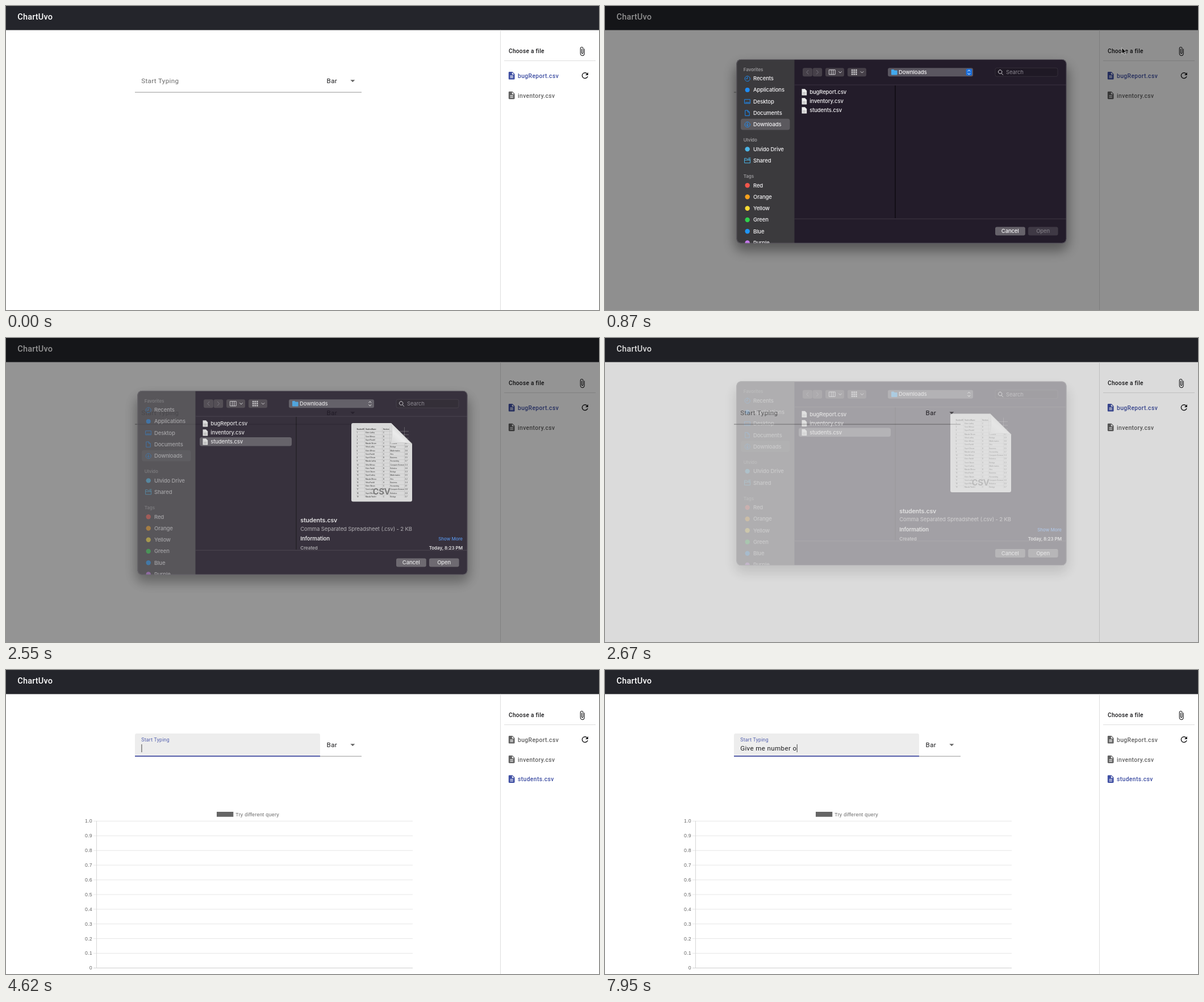
An HTML page that plays this animation: 1044x536 px, repeating every 8000 ms.

```html
<!DOCTYPE html>
<html lang="en">
<head>
<meta charset="utf-8">
<title>Chart query</title>
<style>
html, body { margin: 0; width: 100%; height: 100%; overflow: hidden; background: #fff; }
svg { display: block; width: 1044px; height: 536px; }
text { white-space: pre; }
.app { font: 400 11.6px Roboto, sans-serif; letter-spacing: .36px; }
.app .brand { font-size: 14.5px; font-weight: 500; letter-spacing: .18px; fill: #fff; }
.app .choose { font-size: 10.2px; font-weight: 500; letter-spacing: .25px; }
.app .file { font-size: 10.4px; font-weight: 500; letter-spacing: .35px; }
.chart { font: 8.72px "Liberation Sans", Arial, sans-serif; letter-spacing: .33px; fill: #666; }
.dialog { font: 500 9.5px Inter, sans-serif; letter-spacing: -.13px; fill: #f4f3f5; }
.dialog .head { font-size: 8px; font-weight: 600; letter-spacing: -.1px; fill: #98979a; }
.dialog .small { font-size: 8px; font-weight: 600; letter-spacing: -.05px; }
.dialog .title { font-size: 10.6px; font-weight: 600; }
.dialog .sheet { font-size: 2.8px; font-weight: 500; letter-spacing: 0; fill: #333; }
.line { fill: none; stroke: currentColor; stroke-width: 1; stroke-linecap: round; stroke-linejoin: round; }
</style>
</head>
<body>
<svg id="stage" viewBox="0 0 1044 536" xmlns="http://www.w3.org/2000/svg"></svg>
<script>
const LOOP = 8000;
const INK = '#1c1c1e', INDIGO = '#3f4fa3', GREY = '#626262', BLUE = '#1e8cf5', CYAN = '#4cb6e8';

const text = (x, y, s, attrs = '') => `<text x="${x}" y="${y}" ${attrs}>${s}</text>`;
const rect = (x, y, w, h, fill, attrs = '') =>
  `<rect x="${x}" y="${y}" width="${w}" height="${h}" fill="${fill}" ${attrs}/>`;
const line = (d, color, attrs = '') => `<path class="line" d="${d}" color="${color}" ${attrs}/>`;
const icon = (d, cx, cy, scale, attrs) =>
  `<path d="${d}" transform="translate(${cx} ${cy}) scale(${scale}) translate(-12 -12)" ${attrs}/>`;

const DOC = 'M14 2H6c-1.1 0-2 .9-2 2v16c0 1.1.9 2 2 2h12c1.1 0 2-.9 2-2V8l-6-6zm2 16H8v-2h8v2zm0-4H8v-2h8v2zm-3-5V3.5L18.5 9H13z';
const CLIP = 'M16.5 6v11.5c0 2.21-1.79 4-4 4s-4-1.79-4-4V5c0-1.38 1.12-2.5 2.5-2.5s2.5 1.12 2.5 2.5v10.5c0 .55-.45 1-1 1s-1-.45-1-1V6H10v9.5c0 1.38 1.12 2.5 2.5 2.5s2.5-1.12 2.5-2.5V5c0-2.21-1.79-4-4-4S7 2.79 7 5v12.5c0 3.04 2.46 5.5 5.5 5.5s5.5-2.46 5.5-5.5V6h-1.5z';
const RELOAD = 'M17.65 6.35C16.2 4.9 14.21 4 12 4c-4.42 0-8 3.58-8 8s3.58 8 8 8c3.73 0 6.84-2.55 7.73-6h-2.08c-.82 2.33-3.04 4-5.65 4-3.31 0-6-2.69-6-6s2.69-6 6-6c1.66 0 3.14.69 4.22 1.78L13 11h7V4l-2.35 2.35z';

const fileItem = (id, name, y) => `<g id="${id}">
  ${icon(DOC, 890.2, y, .67, '')}${text(901, y + 4.2, name, 'class="file"')}</g>`;

function page() {
  return `<g class="app" fill="${INK}">
    ${rect(0, 0, 1044, 42.5, '#24252b')}
    ${text(20.3, 24, 'ChartUvo', 'class="brand"')}
    ${rect(870, 42.5, 1, 494, '#dedede')}${rect(877, 96, 161, 1, '#dedede')}
    ${text(885, 83.3, 'Choose a file', 'class="choose"')}
    ${icon(CLIP, 1014.4, 80, .73, '')}${icon(RELOAD, 1019.3, 122.6, .7, '')}
    ${fileItem('bug', 'bugReport.csv', 122.8)}
    <g fill="${GREY}">${fileItem('inv', 'inventory.csv', 157.5)}</g>
    <g fill="${INDIGO}">${fileItem('stu', 'students.csv', 192.2)}</g>
    <path id="field" d="M227 152V115q0-3 3-3h320q3 0 3 3v37z"/>
    ${rect(227, 151.6, 399, 1, '#949494')}
    ${rect(227, 151.6, 326, 1, '#222', 'id="hover"')}
    ${rect(227, 151, 326, 1.6, '#3f4aa8', 'id="focus"')}
    <text id="label">Start Typing</text>
    <text id="typed" x="238.2" y="142.2"></text>
    ${rect(238.4, 131, 1, 14, '#444', 'id="caret"')}
    ${text(564.6, 136.2, 'Bar')}
    <path d="M606.3 130.2h8l-4 4z" fill="#666"/>
  </g>`;
}

function chart() {
  let s = rect(371, 250, 29.3, 8.8, '#666') + text(404.3, 257.6, 'Try different query');
  for (let i = 0; i <= 10; i++) {
    const y = 266 + i * 25.9;
    s += rect(154, y - .1, 562, 1, i < 10 ? '#e6e6e6' : '#cfcfcf');
    s += text(152, y + 3.3, i < 10 ? (1 - i / 10).toFixed(1) : '0', 'text-anchor="end"');
  }
  return `<g id="chart" class="chart">${s}${rect(159, 266, 1, 259, '#d6d6d6')}</g>`;
}

function places() {
  const row = (y, s) => text(261, y + 3.4, s);
  const dot = (y, c, s) => `<circle cx="250.7" cy="${y}" r="4.2" fill="${c}"/>` + row(y, s);
  const tags = [['#f2564b', 'Red'], ['#f7a01d', 'Orange'], ['#fadb34', 'Yellow'],
    ['#2fd04c', 'Green'], ['#1f95f7', 'Blue'], ['#c779ee', 'Purple']];
  return `<g id="places">
    ${rect(239, 198.8, 86.5, 19.8, '#5b595e', 'rx="4"')}
    ${text(243.7, 114.7, 'Favorites', 'class="head"')}
    ${line('M250.7 123.5a4.6 4.6 0 1 0 .1 0M250.7 125.3v3h-2.4', BLUE)}${row(128, 'Recents')}
    <circle cx="250.7" cy="148" r="4" fill="${BLUE}"/>${row(148, 'Applications')}
    ${line('M246 164.8h9.4v7h-9.4zM247.4 170h6.6', BLUE)}${row(168.3, 'Desktop')}
    ${line('M247.2 184h4l3 3v6.4h-7zM251.2 184v3h3', BLUE)}${row(188.6, 'Documents')}
    ${line('M250.7 204.4a4.6 4.6 0 1 0 .1 0M250.7 206.4v5M248.8 209.6l1.9 1.9 1.9-1.9', BLUE)}${row(208.9, 'Downloads')}
    ${text(243.7, 239.2, 'Ulvido', 'class="head"')}
    <circle cx="250.7" cy="252.4" r="4.2" fill="${CYAN}"/>${row(252.4, 'Ulvido Drive')}
    ${line('M245.6 276.4v-7.8h3.4l1.2 1.4h5.4v6.4zM245.6 271.8h10M253 268h3', CYAN)}${row(272.6, 'Shared')}
    ${text(243.7, 303, 'Tags', 'class="head"')}
    ${tags.map(([c, s], i) => dot(316.3 + i * 20.25, c, s)).join('')}
  </g>`;
}

function toolbar() {
  const pill = (x, w, c = '#464049') => rect(x, 109.2, w, 15, c, 'rx="3"');
  const down = x => line(`M${x - 2.4} 115.6l2.4 2.4 2.4-2.4`, '#d8d6da', 'stroke-width="1.2"');
  let cells = '';
  for (let i = 0; i < 9; i++)
    cells += rect(433.8 + i % 3 * 3.6, 111.8 + (i / 3 | 0) * 3.6, 2.6, 2.6, '#c9c7cb');
  return pill(348, 17) + pill(365.6, 16.6) + pill(388, 33) + pill(427, 33) +
    line('M358 113.3l-3.2 3.4 3.2 3.4', '#77727c') + line('M372.4 113.3l3.2 3.4-3.2 3.4', '#77727c') +
    line('M394.8 112.6h10.4v8.2h-10.4zM398.3 112.6v8.2M401.7 112.6v8.2', '#d8d6da') + down(414) +
    cells + down(452.5) + pill(498, 150, '#5a5660') +
    `<path d="M504 113q0-1 1-1h3.4l1.2 1.4h4q1 0 1 1v6q0 1-1 1h-8.6q-1 0-1-1z" fill="#43a9ee"/>` +
    text(517, 119.8, 'Downloads') +
    rect(635.6, 110.8, 10.4, 11.8, '#1a70e0', 'rx="2.5" id="stepper"') +
    line('M638.8 115l2-2.2 2 2.2M638.8 118.6l2 2.2 2-2.2', '#fff') +
    rect(687, 109.2, 110, 15, '#1f1925', 'rx="3" stroke="#3d3743" stroke-width=".7"') +
    line('M695.6 112.7a3.3 3.3 0 1 0 .1 0M698 118.6l2.6 2.8', '#d5d3d7') +
    text(706, 120.2, 'Search', 'fill="#8b8790" font-weight="400"');
}

// Made-up roster for the thumbnail
function sheet() {
  const first = ['Velra', 'Torin', 'Mauda', 'Ebrin', 'Sopel'], last = ['Okrum', 'Pardel', 'Wenso', 'Lathiq'];
  const majors = ['Arts', 'Biology', 'Computer Science', 'Business', 'Mathematics', 'Robotics', 'Accounting'];
  const cols = [617.5, 633, 664, 676.5, 702.5];
  const put = (cells, y, attrs = '') => cells.map((c, i) => text(cols[i], y, c, attrs)).join('');
  let s = put(['StudentID', 'StudentName', 'Section', '', ''], 163, 'font-weight="700"');
  for (let i = 1; i <= 19; i++) {
    const y = 163 + i * 6.26;
    s += rect(616, y - 4.2, 93, .35, '#b5b5b5');
    const far = i > 3;
    s += put([i, first[i * 3 % 5] + ' ' + last[i * 7 % 4], 'ABC'[i * 5 % 3],
      far ? majors[i * 3 % 7] : '', far ? (2.4 + i * 7 % 15 / 10).toFixed(1) : ''], y);
  }
  for (const x of [631.5, 662.5, 675, 701]) s += rect(x, 158, .35, 124, '#b5b5b5');
  return s;
}

function preview() {
  return `<g id="preview">
    <path d="M611 151h67l37 37v98.500q0 3-3 3H611q-3 0-3-3V154q0-3 3-3z" fill="#e9e9e9"/>
    <g class="sheet">${sheet()}</g>
    <path d="M678 151l37 37v-1z" fill="#aaa"/>
    <path d="M678 151c3 12 2 27-1.500 37 11-3 27-3.500 38.500 0z" fill="url(#fold)" stroke="#c2c2c2" stroke-width=".5"/>
    ${text(661, 277.3, 'CSV', 'text-anchor="middle" font-size="14.5" font-weight="700" fill="#777"')}
    </g>`;
}

function details() {
  return `<g id="details">
    ${text(518.3, 326.2, 'students.csv', 'class="title"')}
    ${text(518.3, 340.9, 'Comma Separated Spreadsheet (.csv) - 2 KB', 'fill="#b9b6bc" font-weight="400"')}
    ${text(518.3, 358.4, 'Information', 'font-weight="600"')}
    ${text(804, 358, 'Show More', 'class="small" style="font-weight:500" text-anchor="end" fill="#4a90f4"')}
    ${text(518.3, 374, 'Created', 'class="small" fill="#aeabb1"')}
    ${text(804, 374, 'Today, 8:23 PM', 'class="small" text-anchor="end"')}
  </g>`;
}

function dialog() {
  const files = ['bugReport.csv', 'inventory.csv', 'students.csv'].map((name, i) => {
    const y = 151.8 + i * 16;
    return `<path d="M346.500 ${y - 5.500}h5.500l3.200 3.200v8h-8.700z" fill="#ececec"/>` +
      line(`M348.500 ${y + 1}h4.500M348.500 ${y + 3.200}h4.500`, '#aaa', 'stroke-width=".7"') + text(360.200, y + 3.400, name);
  }).join('');
  return `<rect id="dim" width="1044" height="536"/>
  <g id="dialog" class="dialog">
    ${rect(228, 104, 588, 328, '#000', 'rx="16" opacity=".38" filter="url(#blur)"')}
    <g clip-path="url(#window)">
      ${rect(231, 93, 582, 326, '#231c2a')}
      ${rect(231, 93, 102.5, 326, '#3b3a3d', 'id="side"')}
      ${places()}
      ${rect(333.5, 138.6, 479, 1, '#3a3341')}${rect(333.5, 374.800, 479, 1, '#3d3743')}
      ${rect(510.4, 140, 1.2, 234, '#0b080d')}
      ${toolbar()}
      ${rect(341, 176, 162, 15.600, '#5d5962', 'rx="3.500" id="pick"')}
      ${files}${details()}${preview()}
      ${rect(687, 389.600, 52.800, 15, '#66626a', 'rx="3"')}${text(713.2, 400.400, 'Cancel', 'text-anchor="middle"')}
      <g id="open">${rect(745, 389.600, 52.600, 15, '#66626a', 'rx="3"')}${text(771.2, 400.400, 'Open', 'text-anchor="middle"')}</g>
    </g>
    <rect x="231.800" y="94.300" width="580.400" height="323.900" rx="8" fill="none" stroke="#68656c"/>
  </g>
  <path id="pointer" d="M910 73.600v10.600l2.500-2.300 1.700 4 1.700-.7-1.700-3.900h3.400z" fill="#000" stroke="#fff" stroke-width=".7"/>`;
}

const stage = document.getElementById('stage');
stage.innerHTML = `<defs>
  <clipPath id="window"><rect x="231.500" y="94" width="581" height="324.500" rx="8"/></clipPath>
  <filter id="blur" x="-20%" y="-20%" width="140%" height="140%"><feGaussianBlur stdDeviation="10"/></filter>
  <linearGradient id="fold" x1=".7" y1=".2" x2="0" y2="1"><stop stop-color="#d2d2d2"/><stop offset=".5" stop-color="#fff"/><stop offset="1" stop-color="#e4e4e4"/></linearGradient>
</defs>` + page() + chart() + dialog();

const ui = {};
stage.querySelectorAll('[id]').forEach(el => ui[el.id] = el);
const show = (el, on) => { el.style.display = on ? '' : 'none'; };
const set = (el, attrs) => { for (const k in attrs) el.setAttribute(k, attrs[k]); };
const ramp = (t, a, b) => Math.min(1, Math.max(0, (t - a) / (b - a)));

// time, offset y, dialog opacity, backdrop opacity
const SHEET = [
  [630, -48, 0, 0], [660, -36, .12, .03], [720, -18, .45, .14], [780, -7, .78, .27],
  [870, 0, 1, .44], [930, 0, 1, .5], [2430, 0, 1, .5], [2490, -.2, .95, .48],
  [2550, -1, .82, .42], [2610, -6, .57, .28], [2670, -17.5, .3, .14], [2730, -36, .06, .03], [2760, -48, 0, 0]
];
function pose(t) {
  const i = SHEET.findIndex(k => k[0] > t);
  if (i < 1) return [0, 0, 0];
  const a = SHEET[i - 1], b = SHEET[i], p = (t - a[0]) / (b[0] - a[0]);
  return [1, 2, 3].map(k => a[k] + (b[k] - a[k]) * p);
}

const QUERY = 'Give me number o';
const KEYS = [5130, 5310, 5520, 5670, 5790, 5970, 6090, 6240, 6690, 6900, 7110, 7320, 7440, 7620, 7710, 7950];

function render(now) {
  const t = Math.floor(now / 30) * 30;

  const [y, alpha, dim] = t < 660 ? [0, 0, 0] : pose(t);
  show(ui.dialog, alpha > 0);
  set(ui.dialog, { transform: `translate(0 ${y})`, opacity: alpha });
  set(ui.dim, { opacity: dim });
  const picked = t >= 1560, closing = t >= 2430;
  show(ui.pick, picked);
  show(ui.details, t >= 1620);
  show(ui.preview, t >= 1680);
  set(ui.open, { opacity: picked ? 1 : .42 });
  show(ui.stepper, !closing);
  set(ui.side, { fill: closing ? '#4b494e' : '#3b3a3d' });
  ui.places.style.opacity = closing ? .55 : 1;
  show(ui.pointer, t >= 660 && !closing);

  const loaded = t >= 3570;
  show(ui.chart, loaded);
  show(ui.stu, loaded);
  set(ui.bug, { fill: loaded ? GREY : INDIGO });

  const p = ramp(t, 4410, 4620), e = p * p * (3 - 2 * p);
  const over = ramp(t, 3870, 3930);
  set(ui.field, { opacity: .035 * over + .043 * e });
  set(ui.hover, { opacity: t < 4170 ? over : 0 });
  set(ui.focus, { x: 390 - 163 * e, width: 326 * e });
  set(ui.label, {
    transform: `translate(238.2 ${136.2 - 10.5 * e}) scale(${1 - .25 * e})`,
    fill: p > 0 ? '#525fae' : '#6a6a6a'
  });

  const n = KEYS.filter(k => k <= now).length;
  ui.typed.textContent = QUERY.slice(0, n);
  set(ui.caret, { x: 238.4 + (n ? ui.typed.getComputedTextLength() : 0) });
  show(ui.caret, t >= 4440 && (t < 4920 || n > 0));
}

function frame() {
  render(performance.now() % LOOP);
  requestAnimationFrame(frame);
}
frame();
</script>
</body>
</html>
```
